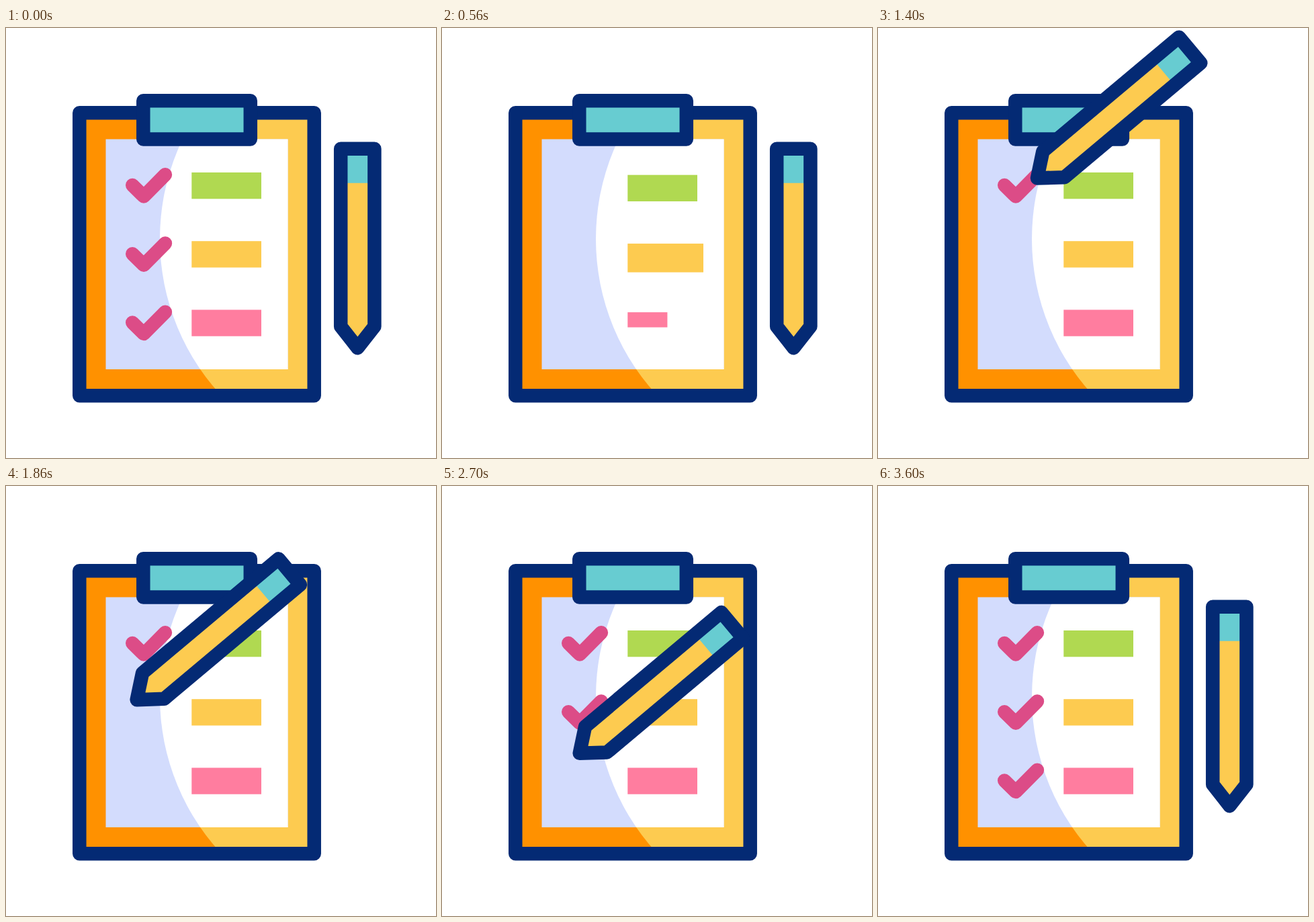
These frames come from a looping animation (640 by 640 pixels, 3.62 s). An HTML page:

```html
<!DOCTYPE html>
<html lang="en">
<head>
<meta charset="utf-8">
<title>Checklist</title>
<style>
  html, body { margin: 0; width: 100%; height: 100%; overflow: hidden; background: #fff; }
  svg { display: block; width: 100%; height: 100%; }
  .line { fill: none; stroke: #042a74; stroke-width: 20.5; stroke-linejoin: round; }
  .check { fill: none; stroke: #dc4c87; stroke-width: 20.4; stroke-linecap: round; stroke-linejoin: round; }
</style>
</head>
<body>
<svg viewBox="0 0 640 640">
  <defs>
    <clipPath id="paper"><rect x="148.5" y="165.5" width="271" height="342.5"/></clipPath>
    <clipPath id="board"><rect x="115" y="130" width="340" height="412"/></clipPath>
  </defs>

  <g clip-path="url(#board)">
    <rect x="109" y="126" width="350" height="421" fill="#ff9100"/>
    <circle cx="572" cy="314" r="343" fill="#fdcb50"/>
  </g>
  <g clip-path="url(#paper)">
    <rect x="148" y="165" width="272" height="343" fill="#d3dcfd"/>
    <circle cx="572" cy="314" r="343" fill="#fff"/>
    <g id="list"></g>
  </g>
  <rect class="line" x="109.3" y="126.3" width="349.4" height="421"/>
  <rect x="204.3" y="108.3" width="159.5" height="57.1" fill="#67ccd1"/>
  <rect class="line" x="204.3" y="108.3" width="159.5" height="57.1"/>

  <!-- pencil, drawn with its tip at 0,0 -->
  <g id="pencil">
    <path d="M-25.1-296.5h50.2v264.5L0 0-25.1-32z" fill="#fdcb50"/>
    <path d="M-25.1-296.5h50.2v51h-50.2z" fill="#67ccd1"/>
    <path class="line" d="M-25.1-296.5h50.2v264.5L0 0-25.1-32z"/>
  </g>
</svg>
<script>
const LOOP = 3620, STEP = 20, ROW = 102.2, TILT = 50;
const REST = [523.3, 476.2];
const START = [186.6, 234], CORNER = [205, 250.6], END = [237, 223.5];
const HUB = [284, 337];               // pivot of the way back
const SCROLL = 345, OUT_END = 300, IN_END = 590;
const COLORS = ['#b0d951', '#fdcb50', '#ff7d9f'];
const POP = [320, 425, 530], POP_TIME = 200;
const DRAW = [[960, 1400], [1920, 2340], [2835, 3200]];
const LEAVE = [560, 960], TRAVEL = [1545, 2460], BACK = [3200, 3600];

const clamp = x => Math.min(1, Math.max(0, x));
const span = (t, [a, b]) => clamp((t - a) / (b - a));
const mix = (a, b, p) => a + (b - a) * p;
const mixPoint = (a, b, p) => [mix(a[0], b[0], p), mix(a[1], b[1], p)];
const add = (a, b, k = 1) => [a[0] + b[0] * k, a[1] + b[1] * k];
const down = (pt, row) => [pt[0], pt[1] + row * ROW];
const inBack = (x, s = 1.70158) => x * x * ((s + 1) * x - s);
const outBack = (x, s) => 1 - inBack(1 - x, s);

function turn([x, y], deg) {
  const a = deg * Math.PI / 180, c = Math.cos(a), s = Math.sin(a);
  return [x * c - y * s, x * s + y * c];
}

function make(name, attrs) {
  const el = document.createElementNS('http://www.w3.org/2000/svg', name);
  for (const key in attrs) el.setAttribute(key, attrs[key]);
  return list.appendChild(el);
}

const list = document.getElementById('list');
const pencil = document.getElementById('pencil');
const checks = COLORS.map((_, i) => make('path', {
  class: 'check', pathLength: 1,
  d: `M188.2 ${234 + i * ROW}l16.8 16.6 32-32.3`
}));
const bars = COLORS.map(fill => make('rect', { width: 103.7, height: 39.3, fill }));

function drawList(t) {
  const leaving = t < OUT_END;
  const shift = leaving
    ? -SCROLL * (t / OUT_END) ** 2
    : SCROLL * (1 - span(t, [OUT_END, IN_END])) ** 2;
  list.setAttribute('transform', `translate(0 ${shift})`);
  bars.forEach((bar, i) => {
    const size = leaving ? 1 : outBack(span(t, [POP[i], POP[i] + POP_TIME]));
    bar.setAttribute('transform', `translate(276.3 ${215 + i * ROW}) scale(${Math.max(0, size)})`);
  });
  checks.forEach((check, i) => {
    const p = leaving ? 1 : span(t, DRAW[i]);
    check.style.visibility = p > 0 ? 'visible' : 'hidden';
    check.setAttribute('stroke-dasharray', p < 1 ? `${p} 2` : 'none');
  });
}

function along(p) {
  const bend = 0.34;
  return p < bend ? mixPoint(START, CORNER, p / bend)
                  : mixPoint(CORNER, END, (p - bend) / (1 - bend));
}

// Tip position and tilt of the pencil
function pencilPose(t) {
  if (t < DRAW[0][0]) {
    const x = span(t, LEAVE), p = outBack(x, 2.4);
    return [[mix(REST[0], START[0], p), mix(REST[1], START[1], outBack(x, 2.2))], TILT * p];
  }
  if (t >= BACK[0]) {
    const p = inBack(span(t, BACK)), tilt = TILT * (1 - p);
    const arm = add(HUB, REST, -1);
    const from = add(down(END, 2), turn(arm, TILT));
    return [add(mixPoint(from, HUB, p), turn(arm, tilt), -1), tilt];
  }
  const row = DRAW.filter(d => t >= d[0]).length - 1;
  if (row < 2 && t > TRAVEL[row]) {
    const p = span(t, [TRAVEL[row], DRAW[row + 1][0]]);
    return [mixPoint(down(END, row), down(START, row + 1), p), TILT];
  }
  return [down(along(span(t, DRAW[row])), row), TILT];
}

function render(now) {
  const t = Math.floor(now % LOOP / STEP) * STEP;
  drawList(t);
  const [tip, tilt] = pencilPose(t);
  pencil.setAttribute('transform', `translate(${tip}) rotate(${tilt})`);
}

const begin = performance.now();
function tick() {
  render(performance.now() - begin);
  requestAnimationFrame(tick);
}
tick();
</script>
</body>
</html>
```
